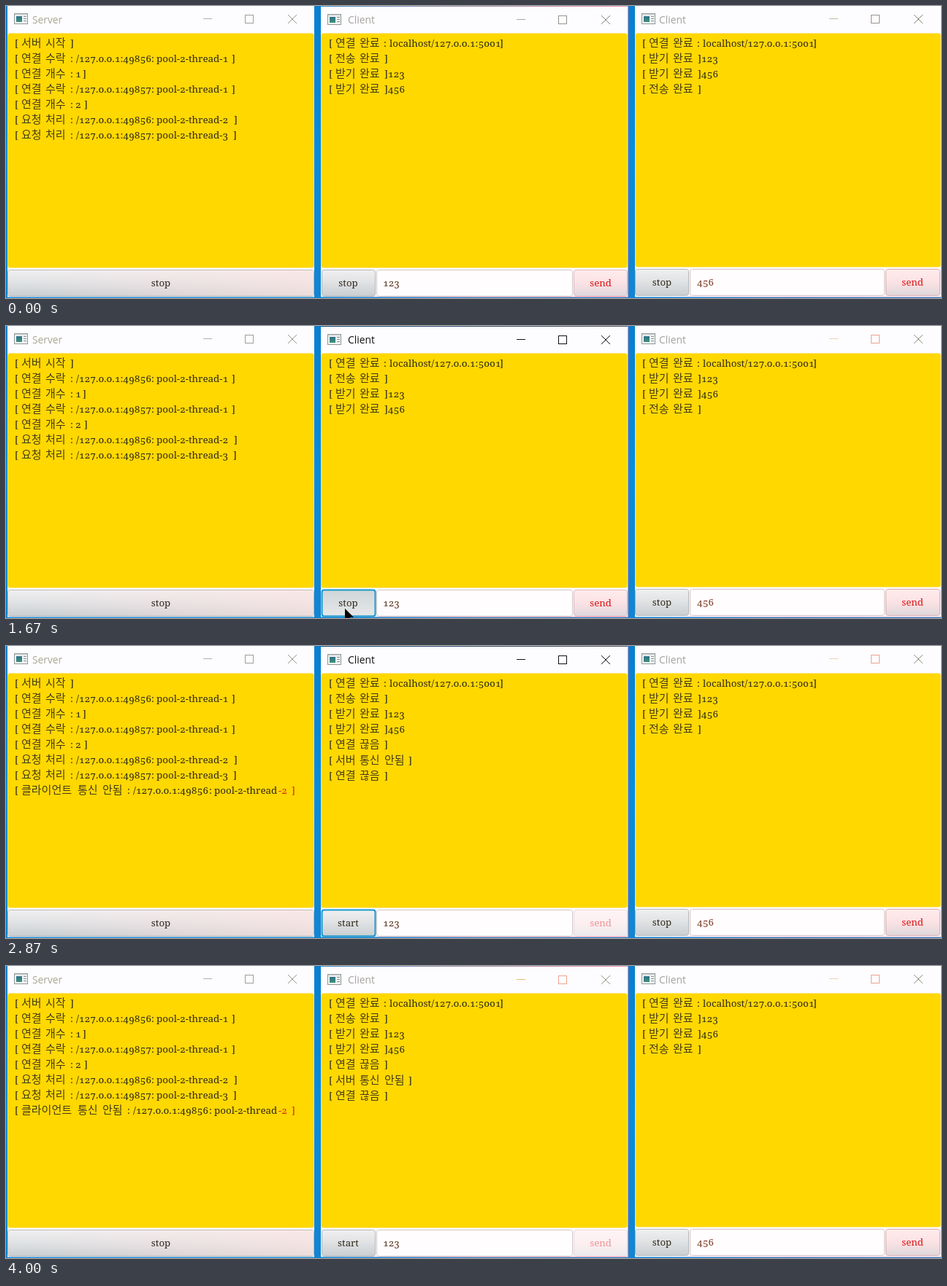
Write an HTML page with a canvas that moves like this. It is 1280 by 401 pixels and loops after 4070 ms.

```html
<!DOCTYPE html>
<html lang="ko">
<head>
<meta charset="utf-8">
<title>Server and clients</title>
<style>
  html, body { margin: 0; width: 100%; height: 100%; overflow: hidden; background: #fff; }
  canvas, svg { position: absolute; left: 0; top: 0; width: 1280px; height: 401px; }
  text { font: 13.2px "Noto Serif", serif; font-variant-numeric: oldstyle-nums; fill: #30281a; }
  .log { font-size: 13.4px; font-weight: 500; }
  .ko { font: 300 15px "Noto Sans CJK KR", "Noto Sans CJK", sans-serif; fill: #463c1a; }
  .title { font: 13.8px "Open Sans", sans-serif; }
  .mid { text-anchor: middle; }
  .send { fill: #dc1414; }
</style>
</head>
<body>
<canvas id="stage" width="1280" height="401"></canvas>
<svg id="type" viewBox="0 0 1280 401" xmlns="http://www.w3.org/2000/svg"></svg>
<script>
const LOOP = 4070;
const HOVER = 1150, PRESS = 1670, RELEASE = 1800, LEAVE = 2400, BLUR = 3870;
const ctx = document.getElementById('stage').getContext('2d');
const svg = document.getElementById('type');
const start = performance.now();

// Token offsets inside a log line
const SHORT = [0, 9, 42, 76];
const WORDS3 = [0, 9, 42, 76, 109];
const LOCAL = [0, 9, 42, 75, 83, 234];
const address = end => [0, 9, 42, 76, 84, 187, 194, end];
const count = end => [0, 9, 42, 76, 83, end];

function label(str, x, y, cls = '') {
  const el = document.createElementNS(svg.namespaceURI, 'text');
  el.setAttribute('x', x);
  el.setAttribute('y', y);
  el.setAttribute('class', cls);
  el.textContent = str;
  svg.append(el);
  return el;
}

function logLine(x, y, str, offsets) {
  return str.split(' ').map((word, i) =>
    label(word, x + offsets[i], y, /[가-힣]/.test(word) ? 'ko' : 'log'));
}

function logLines(x, y, rows, from = 0) {
  return rows.flatMap(([str, offsets], i) =>
    logLine(x, y + (from + i) * 21.1, str, offsets));
}

const show = (els, on) => els.forEach(el => { el.style.display = on ? '' : 'none'; });

label('Server', 36, 23.5, 'title').style.fill = '#aaa692';
const clientTitle = label('Client', 468, 24.3, 'title');
label('Client', 894, 23.5, 'title').style.fill = '#a5a39c';

logLines(12, 55.5, [
  ['[ 서버 시작 ]', SHORT],
  ['[ 연결 수락 : /127.0.0.1:49856 : pool-2-thread-1 ]', address(297)],
  ['[ 연결 개수 : 1 ]', count(93)],
  ['[ 연결 수락 : /127.0.0.1:49857 : pool-2-thread-1 ]', address(297)],
  ['[ 연결 개수 : 2 ]', count(95)],
  ['[ 요청 처리 : /127.0.0.1:49856 : pool-2-thread-2 ]', address(300)],
  ['[ 요청 처리 : /127.0.0.1:49857 : pool-2-thread-3 ]', address(299)]
]);
logLines(442, 56, [
  ['[ 연결 완료 : localhost/127.0.0.1:5001 ]', LOCAL],
  ['[ 전송 완료 ]', SHORT],
  ['[ 받기 완료 ]123', SHORT],
  ['[ 받기 완료 ]456', SHORT]
]);
logLines(871, 55.5, [
  ['[ 연결 완료 : localhost/127.0.0.1:5001 ]', LOCAL],
  ['[ 받기 완료 ]123', SHORT],
  ['[ 받기 완료 ]456', SHORT],
  ['[ 전송 완료 ]', SHORT]
]);

const serverLost = logLines(12, 55.5, [
  ['[ 클라이언트 통신 안됨 : /127.0.0.1:49856 : pool-2-thread -2 ]',
    [0, 9, 86, 120, 154, 162, 266, 273, 361, 379]]
], 7);
serverLost.slice(-2).forEach(el => { el.style.fill = '#d8261c'; });
const clientLost = logLines(442, 56, [
  ['[ 연결 끊음 ]', SHORT],
  ['[ 서버 통신 안됨 ]', WORDS3],
  ['[ 연결 끊음 ]', SHORT]
], 4);

label('stop', 212, 385, 'mid');
const toggle = label('stop', 468.5, 385, 'mid');
label('123', 516, 385).style.fill = '#55301a';
const send = label('send', 814, 385, 'mid send');
label('stop', 898, 384, 'mid');
label('456', 946, 384).style.fill = '#7a3a20';
label('send', 1241, 384, 'mid send');

function rect(x, y, w, h, fill) {
  ctx.fillStyle = fill;
  ctx.fillRect(x, y, w, h);
}

function gradient(x0, y0, x1, y1, ...colors) {
  const g = ctx.createLinearGradient(x0, y0, x1, y1);
  colors.forEach((c, i) => g.addColorStop(i / (colors.length - 1), c));
  return g;
}

function box(x, y, w, h, fill, stroke, line = 1) {
  ctx.beginPath();
  ctx.roundRect(x + .5, y + .5, w - 1, h - 1, 3);
  ctx.fillStyle = fill;
  ctx.fill();
  ctx.strokeStyle = stroke;
  ctx.lineWidth = line;
  ctx.stroke();
}

function path(color, ...points) {
  ctx.beginPath();
  points.forEach(([x, y], i) => i % 2 ? ctx.lineTo(x, y) : ctx.moveTo(x, y));
  ctx.strokeStyle = color;
  ctx.lineWidth = 1;
  ctx.stroke();
}

function icon(x, y) {
  rect(x, y, 19, 15, '#8d9698');
  rect(x + 1, y + 1, 17, 2, '#d9dfe2');
  rect(x + 1, y + 3, 17, 11, '#f4f6f6');
  rect(x + 3, y + 4, 8, 8, gradient(0, y + 4, 0, y + 12, '#2e6f8e', '#3f9478'));
  for (let i = 0; i < 3; i++) rect(x + 13, y + 4 + i * 3, 4, 1, '#7f898c');
}

function controls(x, y, min, max, close) {
  path(min, [x, y + 5.5], [x + 12, y + 5.5]);
  ctx.strokeStyle = max;
  ctx.strokeRect(x + 57.5, y + .5, 11, 11);
  path(close, [x + 116, y], [x + 128, y + 12], [x + 128, y], [x + 116, y + 12]);
}

function frame(x, y, w, bottom) {
  rect(x, y, w, 399 - y, '#fdfcfe');
  box(x, 37, w, bottom - 37, '#ffd800', '#fbe47c');
}

const gray = y => gradient(0, y, 0, y + 37, '#f1f0f1', '#dfe1e3', '#c9ced1');
const pink = y => gradient(0, y, 0, y + 37, '#ffecec', '#fbe2e4', '#ded7dc');

function serverWindow() {
  frame(2, 0, 420, 360);
  icon(11, 10);
  controls(270, 12, '#b4b0a2', '#a09e96', '#98968a');
  box(2, 362, 420, 37, gray(362), '#b9b8ba');
  rect(3, 363, 418, 35, gradient(40, 0, 421, 0,
    'rgba(255,228,226,0)', 'rgba(255,228,226,.35)', 'rgba(255,228,226,.65)'));
}

function clientOne(t) {
  const active = t >= PRESS && t < BLUR;
  const hover = t >= HOVER && t < LEAVE;
  const stopped = t >= RELEASE;
  frame(431, 1, 420, 360);
  rect(431, 0, 420, 1, active ? gradient(431, 0, 851, 0, '#174e78', '#5f5a70')
    : gradient(431, 0, 851, 0, '#4b8fc0', '#a991b0', '#ee9ab4'));
  rect(851, 0, 1, 400, '#e88ca4');
  rect(431, 399, 420, 1, gradient(431, 0, 851, 0, '#7fbbe2', '#f1b2c8', '#f4a0b6'));
  icon(440, 11);
  if (active) controls(699, 13, '#111', '#111', '#111');
  else if (t < 70) controls(699, 13, '#a8a59a', '#96948e', '#85847c');
  else controls(699, 13, '#e2bd68', '#eca58f', '#9a9880');

  const face = t >= PRESS && !stopped ? gradient(0, 362, 0, 399, '#cfd5d8', '#e7e8e9')
    : hover ? gradient(0, 362, 0, 399, '#fdfdfd', '#f3f3f3', '#dfe2e3') : gray(362);
  box(432, 362, 74, 37, face, active ? '#1498cf' : '#b4b5b8', active ? 2 : 1);
  box(507, 362, 269, 37, '#fffdfe', '#cfc6c8');
  ctx.globalAlpha = stopped ? .5 : 1;
  box(777, 362, 74, 37, pink(362), '#dbb9c0');
  ctx.globalAlpha = 1;

  clientTitle.style.fill = active ? '#111' : '#a5a39c';
  toggle.textContent = stopped ? 'start' : 'stop';
  send.style.opacity = stopped ? .42 : 1;
  show(clientLost, stopped);
  show(serverLost, stopped);
}

function clientTwo(t) {
  frame(861, 0, 419, 359);
  icon(870, 10);
  if (t < 70) controls(1127, 12, '#c0b8a0', '#9c948c', '#85847c');
  else controls(1127, 12, '#edcfae', '#eca58f', '#8f8e80');
  box(861, 361, 74, 37, gray(361), '#b4b5b8');
  box(936, 361, 267, 37, '#fffdfe', '#d8c2c4');
  box(1204, 361, 75, 37, pink(361), '#dda9af');
  rect(861, 399, 419, 1, gradient(861, 0, 1280, 0, '#8ec3e7', '#f0aec6', '#f4b7c6'));
}

const ease = p => { p = Math.min(1, Math.max(0, p)); return p * p * (3 - 2 * p); };

function pointer(t) {
  if (t < 1130 || t > 2520) return;
  const y = 402 - 9.5 * ease((t - 1130) / 120) - 4.5 * ease((t - 1330) / 300)
    + 15 * ease((t - 2330) / 170);
  ctx.save();
  ctx.translate(464, y);
  ctx.beginPath();
  [[0, 0], [0, 17], [4, 13], [7, 19], [9, 18], [7, 12], [12, 12]]
    .forEach(([px, py]) => ctx.lineTo(px, py));
  ctx.closePath();
  ctx.fillStyle = '#000';
  ctx.fill();
  ctx.restore();
}

function draw() {
  const t = (performance.now() - start) % LOOP;
  rect(0, 0, 1280, 401, gradient(0, 0, 0, 401, '#087fd0', '#078cdc', '#1285d2'));
  rect(2, 399, 420, 1, '#a9d2ec');
  serverWindow();
  clientOne(t);
  clientTwo(t);
  pointer(t);
  requestAnimationFrame(draw);
}
draw();
</script>
</body>
</html>
```
